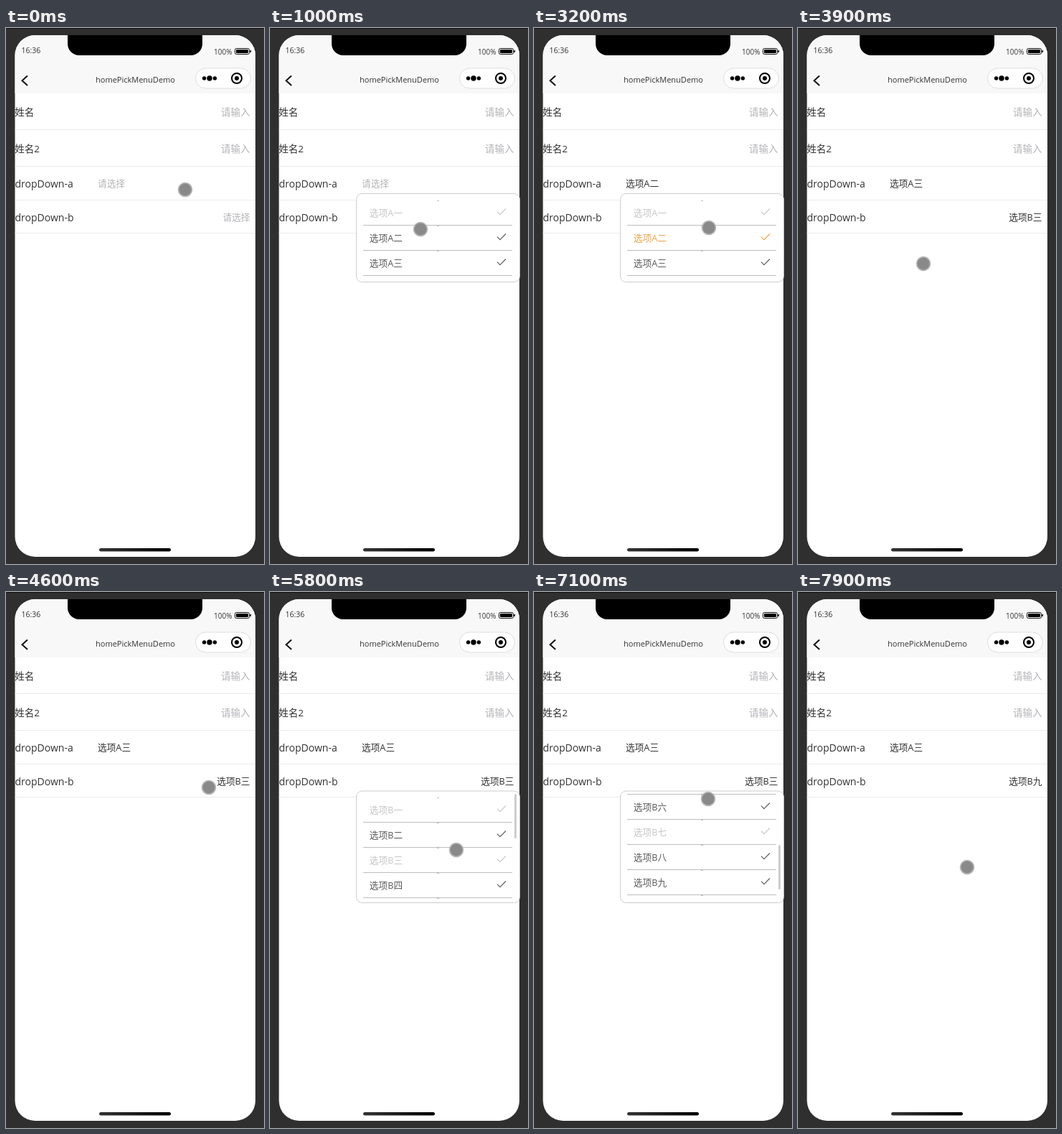
Animation of 360 by 746 pixels, one loop 8 s. Source, as an HTML page:

```html
<!DOCTYPE html>
<html lang="zh-CN">
<head>
<meta charset="utf-8">
<title>Dropdown demo</title>
<style>
  html, body { margin: 0; width: 100%; height: 100%; overflow: hidden; background: #2f2f2f; }
  svg { display: block; width: 360px; height: 746px; }
  text { font-family: "Open Sans", "Noto Sans CJK SC", "Noto Sans CJK", sans-serif; fill: #333; }
  .label { font-size: 13.5px; }
  .field { font-size: 14px; }
  .value, .option { font-size: 12.7px; }
  .hint { fill: #b4b4b8; }
  .end { text-anchor: end; }
  .rule { stroke: #ebebeb; }
  .panel { fill: #fff; stroke: #ccc; }
  .option text { fill: #5a5a5a; }
  .option path { fill: none; stroke: #606060; stroke-width: 1.2; }
  .option line { stroke: #bdbdbd; }
  .off text { fill: #c6c6c6; }
  .off path { stroke: #c8c8c8; }
  .on text { fill: #f0a347; }
  .on path { stroke: #f0a347; }
</style>
</head>
<body>
<svg viewBox="0 0 360 746">
  <defs>
    <clipPath id="screen"><rect x="12.5" y="10" width="335.5" height="726" rx="28"/></clipPath>
    <clipPath id="clipA"><rect x="121" y="231" width="227" height="122" rx="7"/></clipPath>
    <clipPath id="clipB"><rect x="121" y="277.5" width="227" height="154.5" rx="7"/></clipPath>
    <linearGradient id="bar"><stop stop-color="#333"/><stop offset="1"/></linearGradient>
  </defs>
  <rect width="360" height="746" fill="#2f2f2f"/>
  <rect width="360" height="1" fill="#111"/>

  <g clip-path="url(#screen)">
    <rect x="12" y="10" width="337" height="727" fill="#fff"/>
    <rect x="12" y="10" width="337" height="81" fill="#f8f8f8"/>
    <path d="M86 10H274V22a16 16 0 0 1-16 16H102a16 16 0 0 1-16-16Z"/>
    <path class="rule" d="M12 141.5H348M12 192.5H348M12 239.5H348M12 285.5H348"/>
  </g>

  <text x="21.5" y="35" font-size="10.5">16:36</text>
  <text x="290" y="36.5" font-size="10">100%</text>
  <rect x="319.5" y="28.5" width="20" height="8" rx="2" fill="none" stroke="#111"/>
  <rect x="321" y="30" width="17" height="5" rx="1"/>
  <rect x="340.5" y="31" width="1.5" height="3"/>
  <path d="M30 66.5L22.5 73.2L30 80" fill="none" stroke="#111" stroke-width="2"/>
  <text x="180.5" y="76" font-size="11" text-anchor="middle">homePickMenuDemo</text>
  <rect x="264.5" y="56" width="77" height="28" rx="14" fill="#fff" stroke="#ddd"/>
  <circle cx="276.6" cy="70" r="2.7"/>
  <circle cx="284" cy="70" r="3.7"/>
  <circle cx="291.4" cy="70" r="2.7"/>
  <circle cx="322" cy="70" r="7" fill="none" stroke="#000" stroke-width="2"/>
  <circle cx="322" cy="70" r="3"/>

  <text class="label" x="12.3" y="122">姓名</text>
  <text class="label hint end" x="340.5" y="122">请输入</text>
  <text class="label" x="12.3" y="173">姓名2</text>
  <text class="label hint end" x="340.5" y="173">请输入</text>
  <text class="field" x="12.5" y="222">dropDown-a</text>
  <text class="value" id="valueA" x="128" y="221.3"></text>
  <text class="field" x="12.5" y="268.5">dropDown-b</text>
  <text class="value end" id="valueB" x="340.5" y="268"></text>

  <g id="menuA">
    <rect class="panel" x="120.5" y="230.5" width="228" height="123" rx="8"/>
    <g clip-path="url(#clipA)"><g id="listA"></g></g>
  </g>
  <g id="menuB">
    <rect class="panel" x="120.5" y="277" width="228" height="155.5" rx="8"/>
    <g clip-path="url(#clipB)"><g id="listB"></g></g>
    <rect id="thumb" x="341" y="281" width="3" height="62" rx="1.5" fill="#cdcdcd"/>
  </g>

  <rect x="130" y="724" width="100" height="4.6" rx="2.3" fill="url(#bar)"/>

  <g id="cursor">
    <circle r="10.3" fill="#b5b5b5"/>
    <circle r="8.5" fill="#898989"/>
  </g>
</svg>
<script>
const LOOP = 8000, STEP = 100, GLIDE = 400, ROW = 35;
const PICK_A2 = 2400, PICK_A3 = 3800, PICK_B9 = 7900;
const SCROLL_START = 6200, SCROLL_TIME = 900, SCROLL = 179, THUMB_RATIO = 0.397;
const $ = id => document.getElementById(id);
const clamp = v => Math.min(1, Math.max(0, v));
const within = (t, from, to) => t >= from && t < to;

// Arrival time and place; the cursor rests, then glides to the next stop.
const stops = [
  [0, 250, 225], [1000, 210, 280], [1700, 201, 267], [1900, 207, 300],
  [2800, 240, 224], [3200, 244, 278], [3600, 175, 328], [4600, 283, 272],
  [5000, 306, 275], [5800, 260, 359], [6200, 256, 392], [6600, 243, 288],
  [7900, 236, 383]
];

function cursorAt(t) {
  const next = stops.findIndex(s => s[0] > t);
  if (next < 0) return stops[stops.length - 1].slice(1);
  const [t0, x0, y0] = stops[next - 1], [t1, x1, y1] = stops[next];
  const k = clamp(1 - (t1 - t) / Math.min(GLIDE, t1 - t0));
  return [x0 + (x1 - x0) * k, y0 + (y1 - y0) * k];
}

function buildList(id, letter, numerals, disabled, top) {
  $(id).innerHTML = [...numerals].map((n, i) =>
    `<g class="option${disabled.includes(n) ? " off" : ""}" transform="translate(0 ${top + i * ROW})">
      <text x="138.8" y="22">选项${letter}${n}</text>
      <path d="M317 15.7l4 4l8-8.2"/>
      <line x1="130" x2="338" y1="34.5" y2="34.5"/>
      <line x1="233" x2="236" y1="0.5" y2="0.5"/>
    </g>`).join("");
}

function setValue(id, pick) {
  $(id).textContent = pick ? "选项" + pick : "请选择";
  $(id).classList.toggle("hint", !pick);
}

function show(id, visible) {
  $(id).style.display = visible ? "" : "none";
}

function move(id, x, y) {
  $(id).setAttribute("transform", `translate(${x} ${y})`);
}

function draw(t) {
  const a = t < PICK_A2 ? "" : t < PICK_A3 ? "二" : "三";
  setValue("valueA", a && "A" + a);
  setValue("valueB", a && "B" + (t < PICK_B9 ? a : "九"));
  show("menuA", within(t, 700, PICK_A2) || within(t, 2900, PICK_A3));
  show("menuB", within(t, 5400, PICK_B9));
  $("listA").children[1].classList.toggle("on", a === "二");

  const scroll = SCROLL * (1 - (1 - clamp((t - SCROLL_START) / SCROLL_TIME)) ** 2);
  move("listB", 0, -scroll);
  move("thumb", 0, scroll * THUMB_RATIO);
  move("cursor", ...cursorAt(t));
}

buildList("listA", "A", "一二三", "一", 240);
buildList("listB", "B", "一二三四五六七八九十", "一三七", 286);

const start = performance.now();
function tick() {
  const t = (performance.now() - start) % LOOP;
  draw(Math.floor(t / STEP) * STEP);
  requestAnimationFrame(tick);
}
tick();
</script>
</body>
</html>
```
